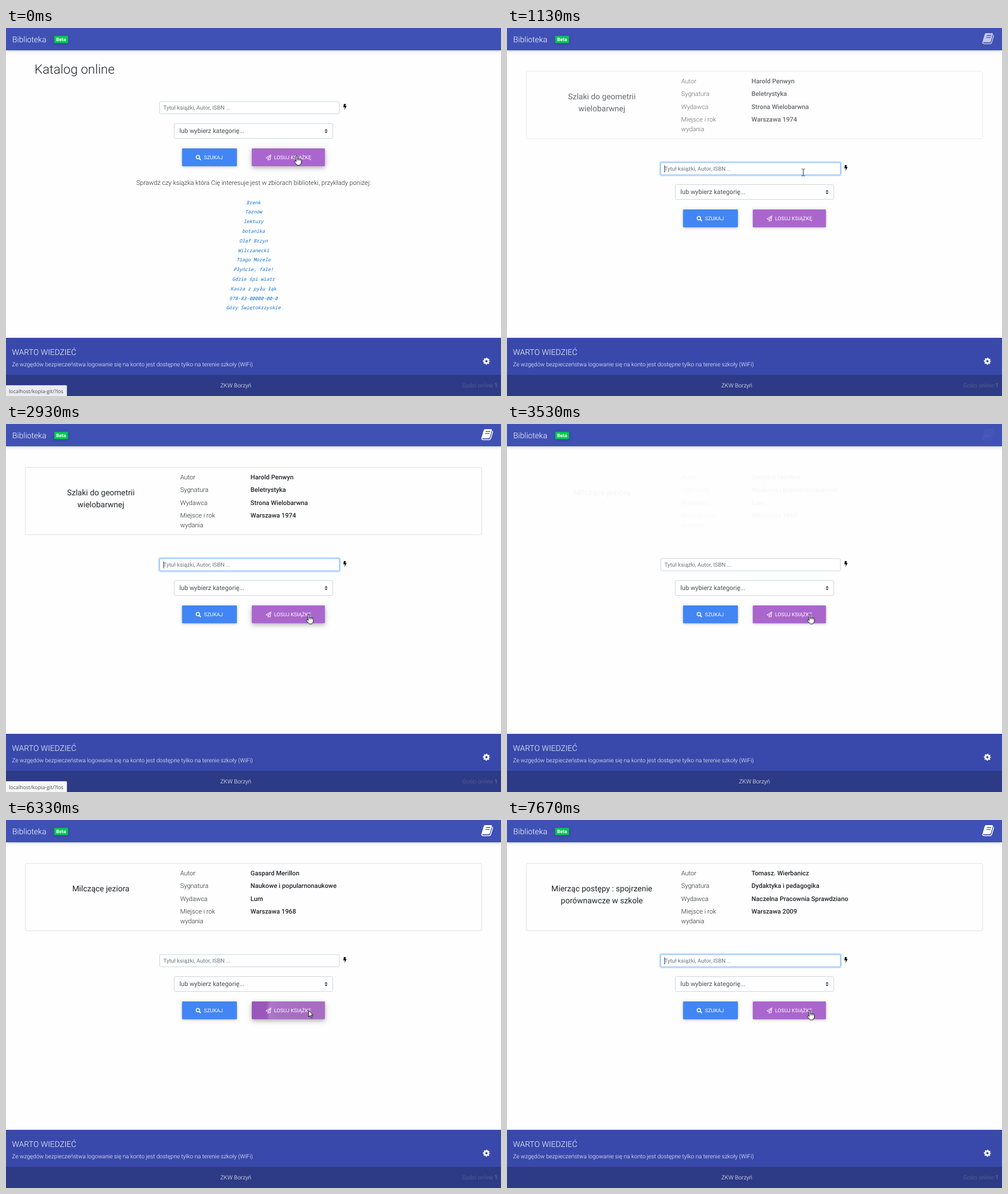
Recreate the animation shown at these times as an HTML page. Size 868x645 px, loop 7.99 s.

```html
<!DOCTYPE html>
<html lang="pl">
<head>
<meta charset="utf-8">
<title>Biblioteka</title>
<style>
html, body { margin: 0; width: 100%; height: 100%; overflow: hidden; background: #fefefe; }
svg { display: block; width: 868px; height: 645px; font: 300 11.2px Roboto, sans-serif; fill: #212529; text-rendering: geometricPrecision; }
.mid { text-anchor: middle; }
.white { fill: #fff; }
.big { font-size: 14px; }
.small { font-size: 10.08px; }
.normal { font-weight: 400; }
.strong { font-weight: 500; }
.line { fill: none; stroke: #fff; }
.field { fill: #fff; stroke: #ced4da; }
.btn { font-size: 9.07px; font-weight: 400; fill: #fff; }
.list { font: italic 8.37px "Noto Sans Mono", monospace; fill: #0f6fd0; }
</style>
</head>
<body>
<svg viewBox="0 0 868 645">
  <defs>
    <clipPath id="btnClip"><rect x="431" y="211" width="128.3" height="31.2" rx="1.4"/></clipPath>
    <radialGradient id="wave">
      <stop offset="0" stop-color="#fff" stop-opacity=".12"/>
      <stop offset=".7" stop-color="#fff" stop-opacity=".15"/>
      <stop offset=".9" stop-color="#fff" stop-opacity=".19"/>
      <stop offset="1" stop-color="#fff" stop-opacity="0"/>
    </radialGradient>
  </defs>

  <g id="site">
    <rect id="header" width="868" height="39" fill="#3f51b5"/>
    <text x="11" y="24.7" class="white big">Biblioteka</text>
    <rect id="badge" x="84.5" y="13.7" width="24.3" height="12.8" rx="1.4" fill="#00c851"/>
    <text x="96.6" y="23.2" class="white mid" font-size="8.4" font-weight="700">Beta</text>

    <g id="home">
      <text x="50" y="80" font-size="22.5">Katalog online</text>
      <text x="434" y="275" class="mid">Sprawdź czy książka która Cię interesuje jest w zbiorach biblioteki, przykłady poniżej:</text>
      <g id="examples" class="list mid"></g>
    </g>

    <g id="book">
      <rect x="34" y="76" width="800" height="118" rx="2.5" fill="none" stroke="#dfdfdf"/>
      <g id="title" class="mid big normal"></g>
      <g id="labels"></g>
      <g id="values" class="strong"></g>
      <path class="white" d="M840.2 9h10.2q2.2 0 1.6 2.1l-3.7 12.3q-.5 1.6-2.3 1.6H836q-2.4 0-1.8-2.2l3.5-11.8q.6-2 2.500-2z"/>
      <path class="line" stroke-width="1.500" d="M852.700 12.300q.9.7.5 2.100l-3.300 10.900q-.6 2.100-2.700 2.100H836.600q-2.600 0-2.600-3.200"/>
      <path d="M841.500 13.300h7.600M840.500 16.600h7.600" fill="none" stroke="#3f51b5" stroke-width="1.400"/>
    </g>

    <g id="form">
      <rect id="glow" x="268.1" y="127.600" width="317.800" height="24" rx="3" fill="none" stroke="#007bff" stroke-width="2.200"/>
      <rect id="input" class="field" x="269.500" y="129" width="315" height="21.200" rx="2"/>
      <text x="276" y="143" class="normal" font-size="9.8" fill="#6c757d">Tytuł książki, Autor, ISBN ...</text>
      <rect id="caret" x="276" y="134" width="1" height="12" fill="#333"/>
      <path d="M592.500 133.200h3.500l-1 3.400h2.300l-4 7.400 1-5h-2.700z" fill="#000"/>
      <rect class="field" x="295" y="167.500" width="278" height="26" rx="2.500"/>
      <text x="304" y="184.400" class="normal" fill="#495057">lub wybierz kategorię...</text>
      <path d="M558.500 179.800l2.800-2.800 2.800 2.800zM558.500 181.400l2.800 2.800 2.800-2.800z" fill="#343a40"/>
      <rect id="search" x="308.700" y="211" width="96.200" height="31.200" rx="1.400" fill="#4285f4"/>
      <circle cx="336.500" cy="226.200" r="3" class="line" stroke-width="1.500"/>
      <path d="M338.700 228.400l3 3" class="line" stroke-width="1.900"/>
      <text x="347" y="230.200" class="btn">SZUKAJ</text>
      <rect id="draw" x="431" y="211" width="128.300" height="31.200" rx="1.400"/>
      <g clip-path="url(#btnClip)"><circle id="ripple" cx="532" cy="229" fill="url(#wave)"/></g>
      <path d="M464.400 222.200l-8.600 5.300 2.800 1.300 4.600-4.300-3.400 5v2.400l1.500-1.700 2 .9z" class="line" stroke-linejoin="round"/>
      <text x="470" y="230.200" class="btn">LOSUJ KSIĄŻKĘ</text>
    </g>

    <rect y="543" width="868" height="65" fill="#3949ab"/>
    <rect y="608" width="868" height="37" fill="#2d3a86"/>
    <text x="10.500" y="573" class="white big">WARTO WIEDZIEĆ</text>
    <text x="10.500" y="592.800" class="white small">Ze wzgędów bezpieczeństwa logowanie się na konto jest dostępne tylko na terenie szkoły (WiFi)</text>
    <g class="line">
      <circle cx="842.400" cy="584" r="3.500" stroke-width="2.900"/>
      <circle cx="842.400" cy="584" r="5.200" stroke-width="1.900" stroke-dasharray="2.042" stroke-dashoffset="1.021"/>
    </g>
    <text id="school" y="629.700" class="white small mid">ZKW Borzyń</text>
    <text id="guests" x="862" y="629.700" class="small" text-anchor="end" fill="#646c93">Gości online <tspan fill="#8a91b5">1</tspan></text>
  </g>

  <g id="status">
    <rect x="-1" y="626.500" width="107.500" height="20" rx="1" fill="#f6f6f6" stroke="#d4d4d4"/>
    <text x="5" y="639.500" font-family="'Open Sans', sans-serif" font-weight="400" font-size="8.95" fill="#4c4f53">localhost/kopia-git/?los</text>
  </g>

  <g id="cursor" stroke-linejoin="round">
    <g id="hand" fill="#fff" stroke="#000" stroke-width=".9">
      <path d="M-.9 1q0-1.300 1.200-1.300T1.500 1V5.800q.2-.9 1.200-.8t1.200.9q.4-.6 1.200-.4t1.100.9q.5-.5 1.200-.2t.8 1.200V11q0 2-1 3.600l-.4.9q-1.300 1.200-3.300 1.100h-1q-1.800 0-2.700-1.200L-3.600 11.300q-.8-1-.1-1.800t1.800 0l1 1.200z"/>
      <path d="M1.500 5.500v3M3.900 6v2.600M6.200 6.500v2.200"/>
    </g>
    <path id="arrow" d="M0 0V11.200l2.600-2.400 1.700 4 1.700-.7-1.700-3.900h3.500z" fill="#fff" stroke="#000" stroke-width=".9"/>
    <path id="beam" d="M-3-6h2l1 .7 1-.7h2M0-5.300V5.300M-3 6h2l1-.7 1 .7h2" fill="none" stroke="#333"/>
  </g>
</svg>

<script>
const LOOP = 7990, BLINK = 520;
const $ = id => document.getElementById(id);
const set = (id, attrs) => { for (const k in attrs) $(id).setAttribute(k, attrs[k]); };
const show = (id, on) => set(id, { visibility: on ? "inherit" : "hidden" });
const ramp = (t, start, length) => Math.min(1, Math.max(0, (t - start) / length));
const lines = (id, x, y, step, rows) => {
  $(id).innerHTML = rows.map((row, i) => `<text x="${x}" y="${y + i * step}">${row}</text>`).join("");
};

// Each visit: click, page swap, input focus, and the drawn book.
const visits = [
  { click: 270, swap: 730, focus: 840, title: ["Szlaki do geometrii", "wielobarwnej"],
    values: ["Harold Penwyn", "Beletrystyka", "Strona Wielobarwna", "Warszawa 1974"] },
  { click: 3000, swap: 3480, focus: 3590, title: ["Milczące jeziora"],
    values: ["Gaspard Merillon", "Naukowe i popularnonaukowe", "Lum", "Warszawa 1968"] },
  { click: 6070, swap: 6530, focus: 6620, title: ["Mierząc postępy : spojrzenie", "porównawcze w szkole"],
    values: ["Tomasz. Wierbanicz", "Dydaktyka i pedagogika", "Naczelna Pracownia Sprawdziano", "Warszawa 2009"] }
];

// Mouse path: time, x, y
const path = [[780, 509.7, 223.8], [1130, 519.5, 253], [1330, 524, 278], [1600, 530.7, 333.8]];

lines("examples", 434, 308.7, 16.78, ["Brenk", "Tarnów", "lektury", "botanika", "Olaf Brzyn", "Wilczanecki",
  "Tiago Morelo", "Płyńcie, fale!", "Gdzie śpi wiatr", "Kasza z pyłu łąk", "978-83-00000-00-0", "Góry Świętokrzyskie"]);
lines("labels", 305.5, 96.8, 22.4, ["Autor", "Sygnatura", "Wydawca", "Miejsce i rok"]);
$("labels").innerHTML += '<text x="305.5" y="180.8">wydania</text>';

// cubic-bezier(.25, .1, .25, 1)
function ease(x) {
  let lo = 0, hi = 1;
  for (let i = 0; i < 20; i++) {
    const s = (lo + hi) / 2, r = 1 - s;
    if (.75 * s * r + s ** 3 < x) lo = s; else hi = s;
  }
  const r = 1 - lo;
  return .3 * lo * r * r + 3 * lo * lo * r + lo ** 3;
}

function mouse(t) {
  const i = path.findIndex(p => t < p[0]);
  if (i < 0) return path.at(-1).slice(1);
  if (i === 0) return path[0].slice(1);
  const [a, b] = [path[i - 1], path[i]], k = ramp(t, a[0], b[0] - a[0]);
  return [a[1] + (b[1] - a[1]) * k, a[2] + (b[2] - a[2]) * k];
}

// A tight and a wide shadow, both deeper as lift goes from 0 to 1
function shadow(id, lift) {
  const mix = (a, b) => a + (b - a) * lift;
  const drop = (y, blur, alpha) => `drop-shadow(0 ${y}px ${blur}px rgba(0,0,0,${alpha}))`;
  $(id).style.filter = drop(mix(1.4, 3.5), mix(1.75, 3.85), mix(.16, .18))
    + drop(mix(1.4, 2.8), mix(3.5, 5.25), mix(.12, .15));
}
for (const id of ["header", "badge", "search"]) shadow(id, 0);

let shown = null;

function render(t) {
  const page = visits.findLast(v => t >= v.swap);
  const pressed = visits.find(v => t >= v.click && t < v.swap);
  const blank = t >= 400 && t < 730;

  if (page && page !== shown) {
    shown = page;
    lines("title", 166.3, 125.4, 21, page.title);
    lines("values", 428.8, 96.8, 22.4, page.values);
  }
  show("site", !blank);
  show("home", !page);
  show("book", page);
  set("book", { opacity: page ? ease(ramp(t, page.swap, 1000)) : 0 });
  set("form", { transform: `translate(0 ${page ? 107 : 0})` });

  const focus = page ? ramp(t, page.focus, 150) * (1 - (pressed ? ramp(t, pressed.click, 150) : 0)) : 0;
  set("glow", { opacity: focus * .25 });
  $("input").style.stroke = focus > .5 ? "#80bdff" : "#ced4da";
  show("caret", focus > 0 && !pressed && Math.floor((t - page.focus) / BLINK) % 2 === 0);

  const loaded = !page || t >= page.focus;
  show("guests", loaded);
  set("school", { x: loaded ? 403 : 434 });

  let hover = 0;
  if (!page) hover = 1;
  else if (page === visits[0]) hover = ramp(t, 1540, 200);
  else if (pressed) hover = ramp(t, pressed.click, 150);
  shadow("draw", hover);

  const press = pressed ? ramp(t, pressed.click, 260) : 0;
  set("draw", { fill: press ? "#9a57ba" : "#aa66cc" });
  set("ripple", { r: 77 * Math.sqrt(press) });

  const status = t < 600 ? (t < 70 ? .95 : 1 - ramp(t, 400, 130))
    : ramp(t, 1700, 120) * (1 - ramp(t, 3130, 130));
  set("status", { opacity: status });

  const [x, y] = mouse(t);
  const overInput = page && y > 236 && y < 258;
  const pointer = overInput ? "beam"
    : (page && y < 318 && t > 780) || (t >= 6200 && t < 6530) ? "arrow" : "hand";
  for (const id of ["hand", "arrow", "beam"]) show(id, id === pointer);
  set("cursor", { transform: `translate(${x} ${y})` });
}

const start = performance.now();
function tick() {
  render((performance.now() - start) % LOOP);
  requestAnimationFrame(tick);
}
tick();
</script>
</body>
</html>
```
